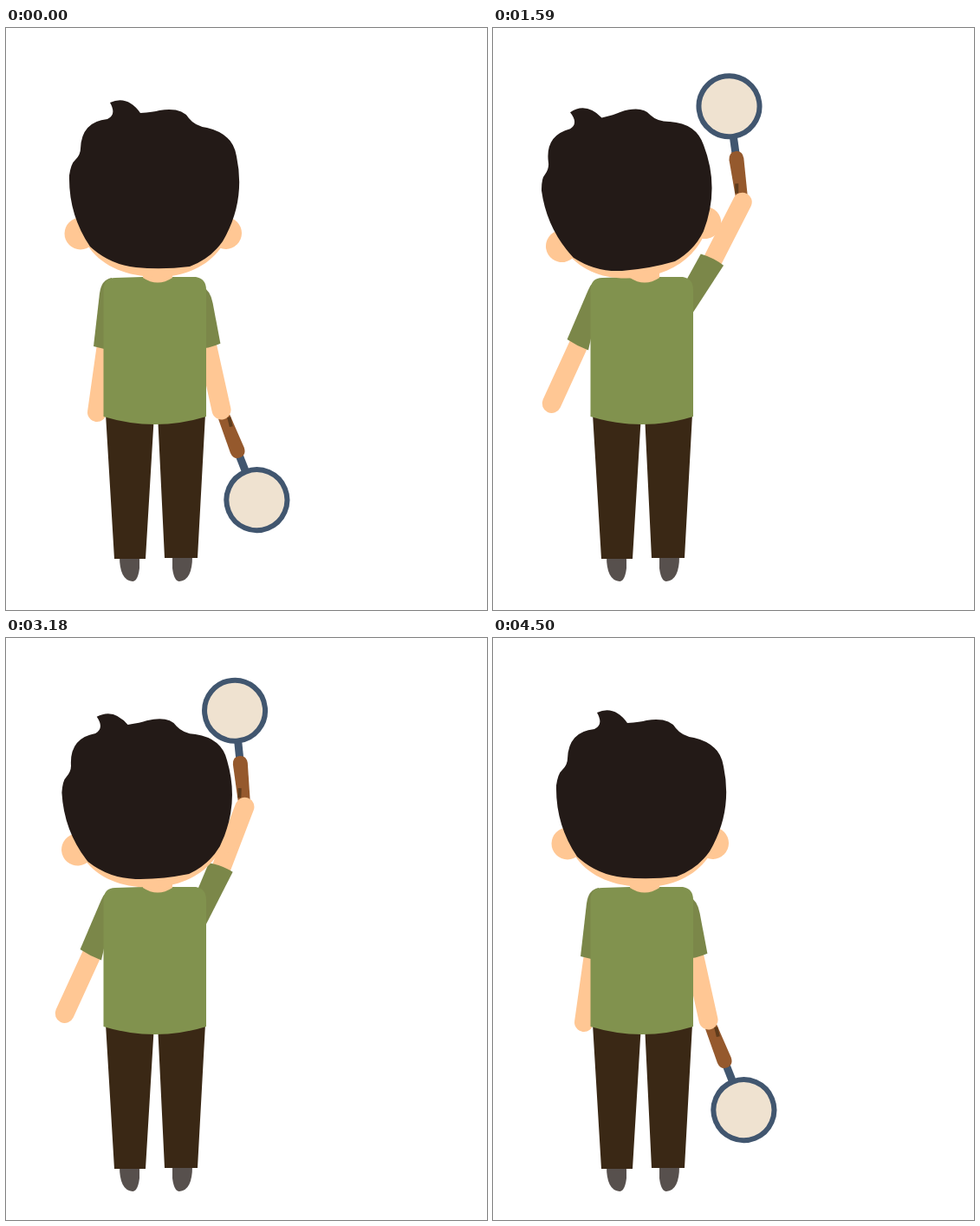
Animation, 555 px wide and 671 px high, one loop 4530 ms. Source, as an HTML page:

```html
<!DOCTYPE html>
<html lang="en">
<head>
<meta charset="utf-8">
<title>Boy waving a magnifying glass</title>
<style>
  html, body { margin: 0; width: 100%; height: 100%; overflow: hidden; background: #fff; }
  svg { display: block; width: 100vw; height: 100vh; }
  .skin { fill: #ffc794; }
  .limb { fill: none; stroke: #ffc794; stroke-width: 22; stroke-linecap: round; }
  .sleeve { fill: #7b8749; }
  /* Joints turn around these points */
  #head { transform-origin: 174px 285px; }
  #leftArm { transform-origin: 121px 310px; }
  #rightArm { transform-origin: 225px 313.5px; }
  #glass { transform-origin: 354px 318px; }
</style>
</head>
<body>
<svg viewBox="0 0 555 671">
  <g id="leftArm">
    <path class="limb" d="M116 365L105 443"/>
    <path class="sleeve" d="M122 288Q110 290 108 306L101 367Q114 371 128 372Z"/>
  </g>

  <g id="rightArm">
    <g id="glass">
      <g transform="translate(354 318)">
        <path d="M54 0H78" stroke="#41566f" stroke-width="9"/>
        <path d="M8 -7L50 -8.5Q59 -8 59 0T50 8.5L8 7Z" fill="#95592d"/>
        <path d="M11 -5L22 -3.5" stroke="#5f3c1c" stroke-width="4"/>
        <circle cx="111.5" r="35" fill="#efe2d0" stroke="#41566f" stroke-width="6"/>
      </g>
    </g>
    <path class="limb" d="M270 318H354"/>
    <path class="sleeve" d="M212 308Q216 301 231 301L279 302.5Q282 317 279 332L212 325Z"/>
  </g>

  <g fill="#57504d">
    <path id="shoe" d="M131 609H154V623Q152 638 146 638Q131 637 131 609Z"/>
    <use href="#shoe" transform="matrix(-1 0 0 1 346 0)"/>
  </g>
  <path fill="#3a2815" d="M115 445H171L161 612H125ZM175 445H230L221 611H183Z"/>
  <path fill="#81924e" d="M112.5 302Q113 288 126 288L158 287H219Q231 289 231 302V448Q172 466 112.5 448Z"/>
  <path class="skin" d="M158 276H192V288Q175 299 158 288Z"/>

  <g id="head">
    <g class="skin">
      <circle cx="86" cy="237" r="18.5"/>
      <circle cx="253.5" cy="236.5" r="18.5"/>
      <path d="M84 228C95 268 130 286 172 287S245 268 258 235Z"/>
    </g>
    <path fill="#231a17" d="M120 86Q140 77 155 98Q170 97 177 95Q203 91 211 104Q218 113 232 115
      Q262 122 266 148Q277 200 250 246Q236 266 212 275Q180 279 150 276Q120 273 97 252
      Q72 215 73 170Q75 156 80 152Q86 146 86 139Q87 108 117 105Q128 100 120 86Z"/>
  </g>
</svg>
<script>
const LOOP = 4530, STEP = 30;
const START = 600, TOP = 1350, LOW = 2150, END = 4260;

// Sine ease from 0 to 1 between two times
function ease(t, from, to) {
  const u = Math.min(1, Math.max(0, (t - from) / (to - from)));
  return (1 - Math.cos(Math.PI * u)) / 2;
}

function turn(id, degrees) {
  document.getElementById(id).style.transform = `rotate(${degrees}deg)`;
}

function draw() {
  const t = Math.floor(performance.now() % LOOP / STEP) * STEP;
  const between = (from, to) => ease(t, from, to);

  const rightLift = between(START, TOP) - between(3240, 4110);
  const wave = between(TOP, LOW) - between(LOW, 3150);
  turn("rightArm", 77.5 - 146.5 * rightLift + 29.5 * wave);

  // The wrist straightens on each upstroke and bends back at the top
  const straighten = 11 * between(START, 960) + 38 * between(1560, 2700);
  const bend = 37 * between(1080, 1560) + 33 * between(2700, 3300);
  turn("glass", -9 + straighten - bend + 21 * between(3540, 4200));

  const settle = between(3390, END);
  turn("leftArm", 16.6 * (between(START, TOP) - settle));
  turn("head", -10 * between(START, 1480) + 13 * between(1480, LOW) - 8 * between(LOW, 3390) + 5 * settle);

  requestAnimationFrame(draw);
}
draw();
</script>
</body>
</html>
```
